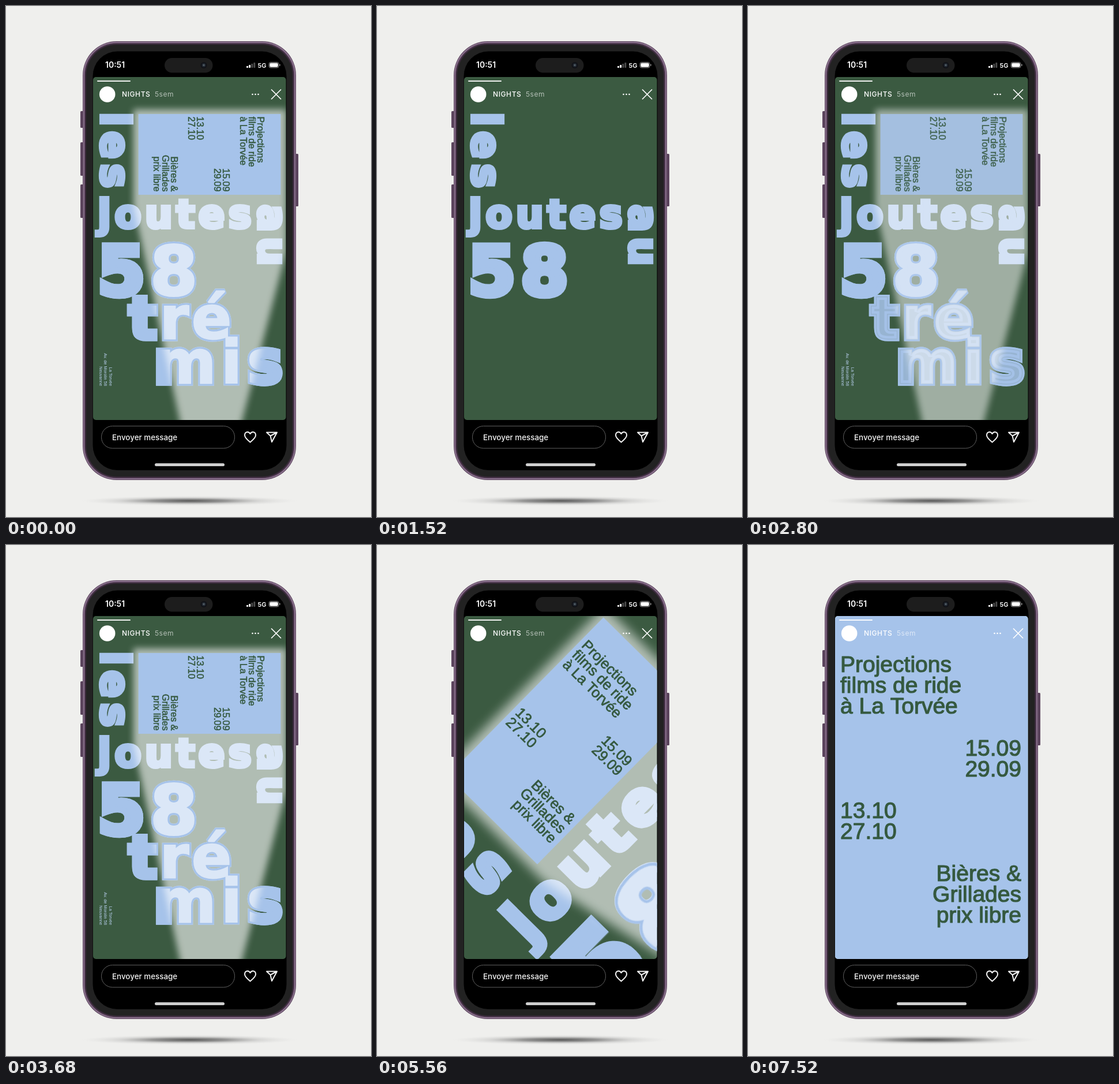
These frames come from a looping animation (633x885 px, 8 s). An HTML page with a canvas:

```html
<!DOCTYPE html>
<html lang="fr">
<head>
<meta charset="utf-8">
<title>Story</title>
<style>
html, body { margin: 0; width: 100%; height: 100%; overflow: hidden; background: #efefed; }
canvas { display: block; }
</style>
</head>
<body>
<canvas id="stage" width="633" height="885"></canvas>
<script>
const W = 633, H = 885, LOOP = 8000;
const GREEN = '#3b5a41', BLUE = '#a6c3ea', INK = '#35593f';
const HEAVY = '"DejaVu Sans", sans-serif';
const GROT = '"Liberation Sans", Arial, sans-serif';
const UI = 'Inter, sans-serif';
const SCREEN = [151, 123, 334.5, 594, 5];
const CARD = { x: 353, y: 257, scale: 0.414 };
const CENTER = { x: 318, y: 420 };

const ctx = document.getElementById('stage').getContext('2d');

const clamp = v => Math.min(1, Math.max(0, v));
const span = (t, a, b) => clamp((t - a) / (b - a));
const mix = (a, b, p) => a + (b - a) * p;
const cubicOut = p => 1 - (1 - p) ** 3;
const quintInOut = p => p < 0.5 ? 16 * p ** 5 : 1 - 16 * (1 - p) ** 5;

function layer(draw) {
  const c = document.createElement('canvas');
  c.width = W;
  c.height = H;
  draw(c.getContext('2d'));
  return c;
}

function box(g, x, y, w, h, r, fill, stroke, line = 1) {
  g.beginPath();
  g.roundRect(x, y, w, h, r);
  if (fill) { g.fillStyle = fill; g.fill(); }
  if (stroke) { g.strokeStyle = stroke; g.lineWidth = line; g.stroke(); }
}

function label(g, str, x, y, font, fill, { align = 'left', gap = 0, stroke = 0 } = {}) {
  g.font = font;
  g.textAlign = align;
  g.letterSpacing = gap + 'px';
  g.fillStyle = fill;
  g.fillText(str, x, y);
  if (stroke) {
    g.strokeStyle = fill;
    g.lineWidth = stroke;
    g.lineJoin = 'round';
    g.strokeText(str, x, y);
  }
  g.letterSpacing = '0px';
}

// Phone body and its fixed interface
const phone = layer(g => {
  g.fillStyle = '#efefed';
  g.fillRect(0, 0, W, H);

  g.save();
  g.translate(318, 857);
  g.scale(1, 0.046);
  const shade = g.createRadialGradient(0, 0, 0, 0, 0, 188);
  shade.addColorStop(0, 'rgba(60,60,60,.85)');
  shade.addColorStop(0.35, 'rgba(90,90,90,.6)');
  shade.addColorStop(0.65, 'rgba(140,140,140,.24)');
  shade.addColorStop(1, 'rgba(200,200,200,0)');
  g.fillStyle = shade;
  g.fillRect(-200, -200, 400, 400);
  g.restore();

  for (const [x, y, h] of [[129, 182, 29], [129, 236, 58], [129, 309, 58], [502, 256, 91]])
    box(g, x, y, 5, h, 1.5, '#5b445d');

  box(g, 133, 61, 370, 760, 59, '#5f4861');
  box(g, 135, 63, 366, 756, 57, null, '#957b98', 1.4);
  box(g, 137, 65, 362, 752, 55, '#3a2a3b');
  box(g, 139, 67, 358, 748, 53, '#222222');
  box(g, 150.5, 78.5, 336, 725.5, 43, '#000');

  box(g, 275, 90, 83.5, 25.5, 12.7, '#1d1d1d');
  for (const [r, c] of [[5.5, '#111318'], [3.2, '#262d36'], [1.4, '#56636b']]) {
    g.beginPath();
    g.arc(343, 102.5, r, 0, 7);
    g.fillStyle = c;
    g.fill();
  }

  label(g, '10:51', 172, 107, '600 14px ' + UI, '#fff');
  for (let i = 0; i < 4; i++)
    box(g, 417 + i * 4.1, 104 - i * 2, 3, 3 + i * 2, 0.8, i < 2 ? '#fff' : '#4c4c4c');
  label(g, '5G', 436.5, 106.5, '600 11px ' + UI, '#fff');
  box(g, 456, 97.5, 17, 9.5, 3, null, '#8b8b8b');
  box(g, 457.3, 98.8, 14.4, 6.9, 1.8, '#fff');
  box(g, 474.2, 100.5, 1.4, 3.5, 0.7, '#8b8b8b');

  box(g, 165.5, 727.5, 231, 38.5, 19, '#000', '#606060');
  label(g, 'Envoyer message', 184, 751.5, '500 13.4px ' + UI, '#f4f4f4');

  g.strokeStyle = '#f4f4f4';
  g.lineWidth = 2;
  g.lineJoin = 'round';
  g.stroke(new Path2D('M423.5 755.5C418 751 414 747.5 414 743.5C414 736.5 421 736.5 423.5 741C426 736.5 433 736.5 433 743.5C433 747.5 429 751 423.5 755.5Z'));
  g.stroke(new Path2D('M452 738.5H470L461 755L458.5 744.5ZM458.5 744.5L470 738.5'));
  box(g, 258, 792, 121, 5, 2.5, '#cfcfcf');
});

// Soft projector light, drawn once
const beam = layer(g => {
  g.filter = 'blur(6px)';
  g.fillStyle = 'rgba(255,255,255,.6)';
  g.fill(new Path2D('M221 179H486V425L405 735H305L221 345Z'));
});

// Heading words: text, x, y, size, gap, vertical
const words = {
  les: ['les', 165, 184, 70, 9, true],
  day: ['joutes', 159, 384, 67, 6.5],
  au: ['au', 438, 344, 70, 9, true],
  num: ['58', 159, 500, 118, 9],
  top: ['tré', 213, 575.5, 102, 5],
  low: ['mis', 256, 653, 104, 9]
};
const BOLDEN = 0.09;

function word(g, key, { dx = 0, dy = 0, alpha = 1, inset = 0 } = {}) {
  const [str, x, y, size, gap, vertical] = words[key];
  g.save();
  g.globalAlpha *= alpha;
  g.translate(x + dx, y + dy);
  if (vertical) g.rotate(Math.PI / 2);
  g.font = `bold ${size}px ${HEAVY}`;
  g.letterSpacing = gap + 'px';
  g.textAlign = 'left';
  g.fillStyle = g.strokeStyle = BLUE;
  g.lineJoin = 'miter';
  g.miterLimit = 2;
  g.lineWidth = size * BOLDEN - 2 * inset;
  g.fillText(str, 0, 0);
  g.strokeText(str, 0, 0);
  g.restore();
}

// Blue edges that stay visible inside the light
const rims = layer(g => {
  const keys = ['num', 'top', 'low'];
  keys.forEach(key => word(g, key));
  g.globalCompositeOperation = 'destination-out';
  keys.forEach(key => word(g, key, { inset: 3.2 }));
});

function card(alpha) {
  ctx.save();
  ctx.globalAlpha *= alpha;
  ctx.translate(CARD.x, CARD.y);
  ctx.rotate(Math.PI / 2);
  ctx.scale(CARD.scale, CARD.scale);
  ctx.translate(-CENTER.x, -CENTER.y);
  ctx.fillStyle = BLUE;
  ctx.fillRect(149, 122, 338, 596);
  const block = (lines, y, align) => lines.forEach((s, i) =>
    label(ctx, s, align === 'left' ? 160 : 474, y + i * 36.3, '39px ' + GROT, INK, { align, stroke: 1.2 }));
  block(['Projections', 'films de ride', 'à La Torvée'], 219.5, 'left');
  block(['15.09', '29.09'], 364.5, 'right');
  block(['13.10', '27.10'], 473, 'left');
  block(['Bières &', 'Grillades', 'prix libre'], 581.5, 'right');
  ctx.restore();
}

function address(alpha) {
  ctx.save();
  ctx.globalAlpha *= alpha;
  ctx.translate(178.5, 658);
  ctx.rotate(Math.PI / 2);
  ['La Torvée', 'Av. de Morolin 58', 'Neuvanne'].forEach((s, i) =>
    label(ctx, s, 0, i * 8.4, '7.4px ' + GROT, '#b9d0f0', { align: 'right' }));
  ctx.restore();
}

function poster(t) {
  const whole = t < 80;
  const slide = (a, b, from) => whole ? 0 : from * (1 - cubicOut(span(t, a, b)));
  const light = whole ? 1 : cubicOut(span(t, 2400, 3240));

  word(ctx, 'les', { dy: slide(60, 480, -215) });
  word(ctx, 'day', { dx: slide(260, 700, -290) });
  word(ctx, 'au', { dx: slide(500, 880, 70) });
  word(ctx, 'num', { dx: slide(840, 1640, -214) });
  address(whole ? 1 : span(t, 1920, 2080));

  if (!light) return;
  word(ctx, 'top', { alpha: light });
  word(ctx, 'low', { alpha: light });
  ctx.save();
  ctx.globalAlpha = light;
  ctx.drawImage(beam, 0, 0);
  ctx.drawImage(rims, 0, 0);
  ctx.restore();
  card(light);
}

function header() {
  box(ctx, 158, 129, 58, 2, 1, 'rgba(255,255,255,.92)');
  ctx.beginPath();
  ctx.arc(175.7, 153, 13.8, 0, 7);
  ctx.fillStyle = '#fff';
  ctx.fill();
  label(ctx, 'NIGHTS', 201, 157.3, '500 12px ' + UI, '#fff', { gap: 0.6 });
  label(ctx, '5sem', 258, 157.3, '12px ' + UI, 'rgba(255,255,255,.62)', { gap: 0.5 });
  ctx.fillStyle = '#fff';
  for (let i = 0; i < 3; i++) {
    ctx.beginPath();
    ctx.arc(427.5 + i * 5, 153, 1.3, 0, 7);
    ctx.fill();
  }
  ctx.strokeStyle = '#fff';
  ctx.lineWidth = 1.7;
  ctx.stroke(new Path2D('M460 144.5L477 161.5M477 144.5L460 161.5'));
}

function render(t) {
  ctx.drawImage(phone, 0, 0);
  ctx.save();
  ctx.beginPath();
  ctx.roundRect(...SCREEN);
  ctx.clip();
  ctx.fillStyle = GREEN;
  ctx.fillRect(0, 0, W, H);

  // The camera turns and closes in on the card
  const p = quintInOut(span(t, 5040, 6080));
  const zoom = (1 / CARD.scale) ** p;
  ctx.save();
  ctx.translate(mix(CARD.x, CENTER.x, p), mix(CARD.y, CENTER.y, p));
  ctx.rotate(-Math.PI / 2 * p);
  ctx.scale(zoom, zoom);
  ctx.translate(-CARD.x, -CARD.y);
  poster(t);
  ctx.restore();

  header();
  ctx.restore();
}

const start = performance.now();
function tick() {
  render((performance.now() - start) % LOOP);
  requestAnimationFrame(tick);
}
tick();
</script>
</body>
</html>
```
